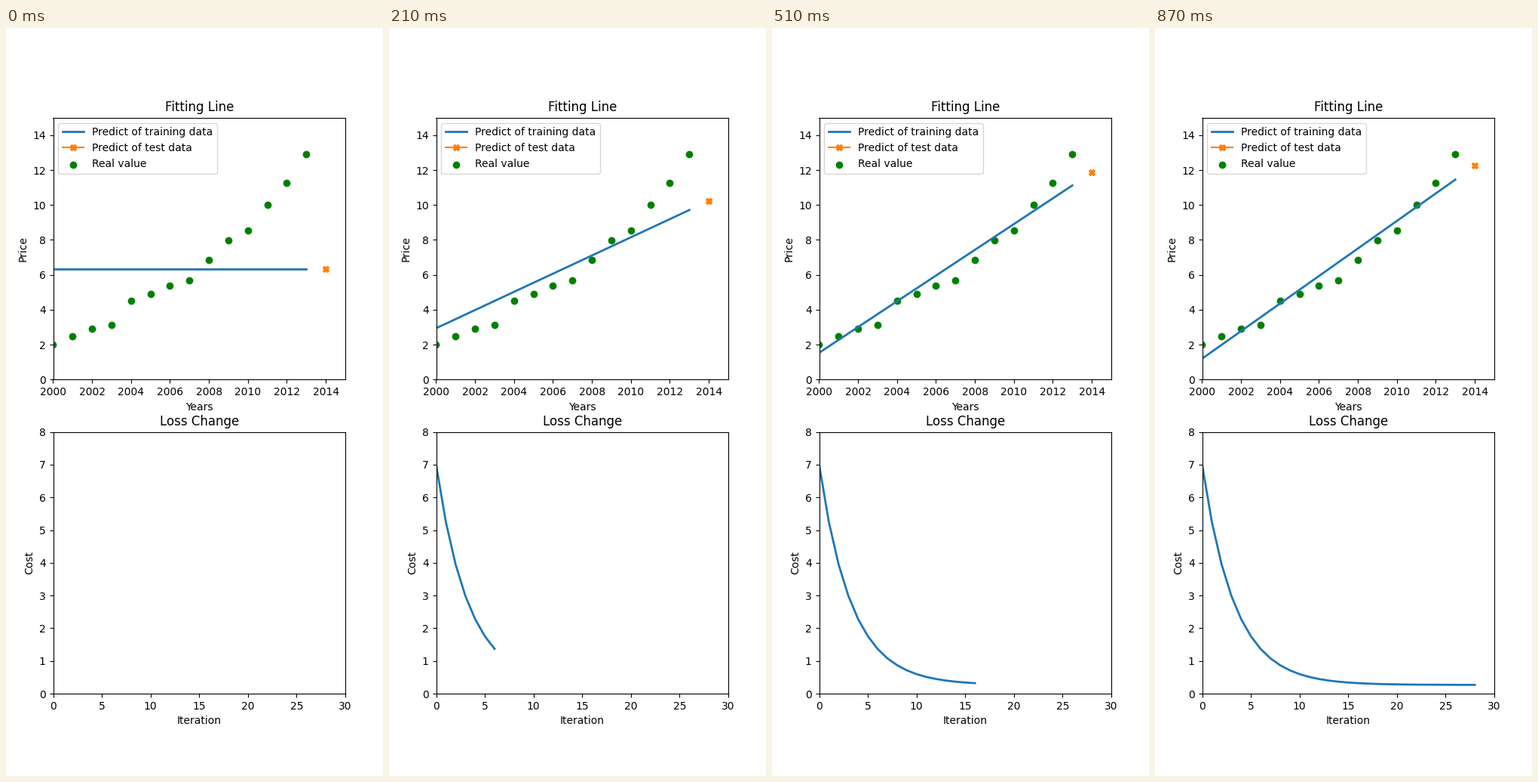
These frames come from a looping animation (500 px wide and 990 px high, 900 ms). A matplotlib script:

```python
import matplotlib.pyplot as plt
import numpy as np
from matplotlib.animation import FuncAnimation

FRAMES = 30
INTERVAL = 30
RATE = 0.01
LOSS_SCALE = 0.04634

years = np.arange(2000, 2014)
prices = np.array([2.000, 2.500, 2.900, 3.147, 4.515, 4.903, 5.365,
                   5.704, 6.853, 7.971, 8.561, 10.000, 11.280, 12.900])
test_year = 2014


def normalise(x):
    return (x - years.mean()) / years.std()


def descend(steps):
    """Gradient descent on the slope; the bias starts at its optimum."""
    x = normalise(years)
    bias, slope = prices.mean(), 0.0
    slopes, losses = [], []
    for _ in range(steps):
        error = bias + slope * x - prices
        slopes.append(slope)
        losses.append(LOSS_SCALE * np.sum(error ** 2))
        slope -= RATE * np.sum(error * x)
    return bias, slopes, losses


bias, slopes, losses = descend(FRAMES)


def predict(x, step):
    return bias + slopes[step] * normalise(x)


fig, (fit_ax, loss_ax) = plt.subplots(2, 1, figsize=(5, 9.9), dpi=100)

fit_line, = fit_ax.plot([], [], lw=2, label="Predict of training data")
test_mark, = fit_ax.plot([], [], marker="X", label="Predict of test data")
fit_ax.scatter(years, prices, color="green", label="Real value")
fit_ax.set(title="Fitting Line", xlabel="Years", ylabel="Price",
           xlim=(2000, 2015), ylim=(0, 15))
fit_ax.legend(loc="upper left")

loss_line, = loss_ax.plot([], [], lw=2)
loss_ax.set(title="Loss Change", xlabel="Iteration", ylabel="Cost",
            xlim=(0, 30), ylim=(0, 8))


def update(step):
    fit_line.set_data(years, predict(years, step))
    test_mark.set_data([test_year], [predict(test_year, step)])
    loss_line.set_data(range(step), losses[:step])
    return fit_line, test_mark, loss_line


anim = FuncAnimation(fig, update, frames=FRAMES, interval=INTERVAL,
                     repeat=True, repeat_delay=0)
plt.show()
```
